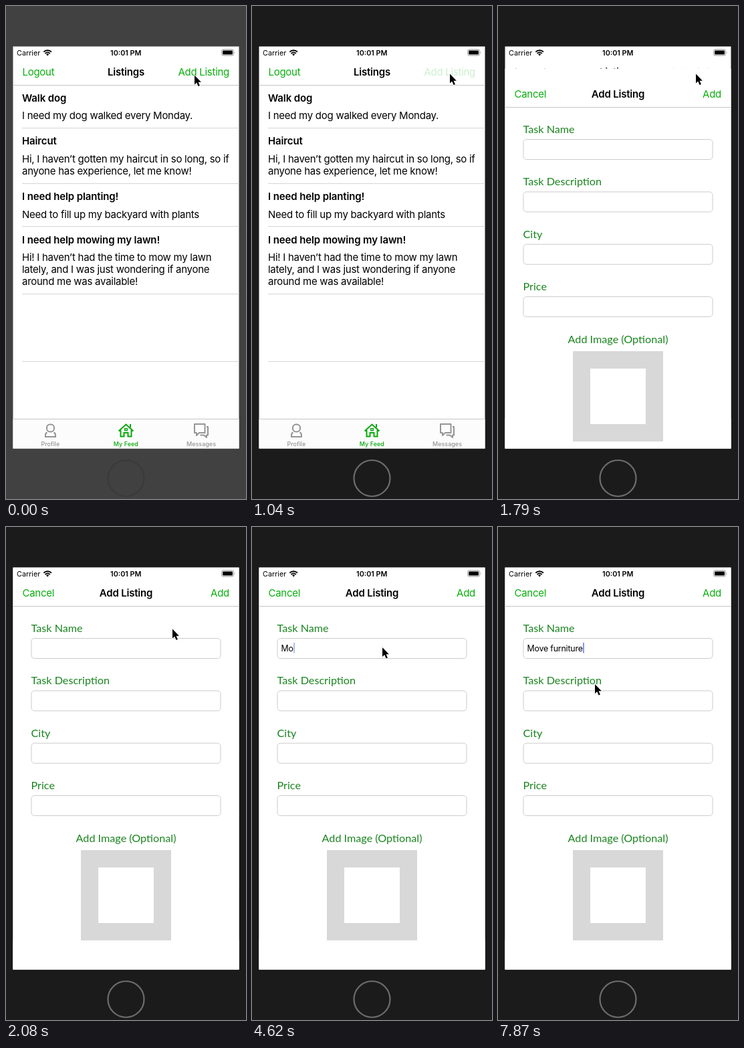
Recreate the animation shown at these times as an HTML page. Size 359 px wide and 737 px high, loop 8000 ms.

```html
<!DOCTYPE html>
<html lang="en">
<head>
<meta charset="utf-8">
<title>Add a listing</title>
<style>
  html, body { margin: 0; width: 100%; height: 100%; overflow: hidden; background: #1b1b1b; }
  svg { display: block; width: 100%; height: 100%; }
  text { font-family: Inter, Roboto, "Liberation Sans", sans-serif; white-space: pre; fill: #000; }
  .body { font-size: 15px; letter-spacing: -.27px; }
  .head { font-size: 15px; font-weight: 600; letter-spacing: -.12px; }
  .title { font-size: 15px; font-weight: 600; letter-spacing: -.2px; text-anchor: middle; }
  .link { font-size: 15px; letter-spacing: -.28px; fill: #08ae0c; }
  .status { font-size: 10.8px; }
  .tab { font-size: 9px; font-weight: 500; text-anchor: middle; fill: #959595; }
  .label { font-family: Lato, "Open Sans", sans-serif; font-size: 16.2px; fill: #1a851f; }
  .typed { font-size: 12.4px; letter-spacing: -.2px; }
  .end { text-anchor: end; }
  .mid { text-anchor: middle; }
  .rule { stroke: #d6d6d6; stroke-width: 1; }
  .bar { stroke: #c6c6c6; stroke-width: 1; }
  .field { fill: #fff; stroke: #cbcbcb; stroke-width: 1; }
  .icon { fill: none; stroke: #959595; stroke-width: 2; }
  .icon.on { stroke: #08a80c; }
  .tab.on { fill: #08a80c; }
</style>
</head>
<body>
<svg viewBox="0 0 359 737" preserveAspectRatio="none">
  <defs>
    <clipPath id="screen"><rect x="10.5" y="60.5" width="338" height="601"/></clipPath>
  </defs>
  <rect id="bezel" width="359" height="737"/>
  <circle id="home" cx="179.5" cy="706" r="27" fill="none" stroke-width="2.2"/>

  <g clip-path="url(#screen)">
    <rect x="10" y="60" width="340" height="603" fill="#fff"/>

    <g id="feed">
      <text class="link" x="24.5" y="104">Logout</text>
      <text class="title" x="179.5" y="104">Listings</text>
      <text class="link end" id="open" x="334" y="104">Add Listing</text>
      <path class="bar" d="M10 118.5H349"/>
      <g id="rows"></g>

      <rect x="10" y="617" width="340" height="45" fill="#fcfcfc"/>
      <path class="bar" d="M10 617.5H349"/>
      <g class="icon">
        <rect x="61" y="625.5" width="11" height="11" rx="4.8"/>
        <path d="M61.5 637.5Q59 638.5 59 641.5V644H74V641.5Q74 638.5 71.500 637.5"/>
      </g>
      <g class="icon on">
        <path d="M168.500 635.5L179.500 625.500L190.500 635.5M171.500 634V643.5H176.500V638H182.500V643.500H187.500V634M186 625V630"/>
        <rect x="177.700" y="631.700" width="3.600" height="3" stroke-width="1.500"/>
      </g>
      <g class="icon" stroke-linejoin="round">
        <path d="M282 625H297.500V638H289L285 642V638H282Z"/>
        <path d="M300 629H302V641.500H300V645L296 641.500H290.500"/>
      </g>
      <text class="tab" x="66.300" y="658">Profile</text>
      <text class="tab on" x="179.300" y="658">My Feed</text>
      <text class="tab" x="292" y="658">Messages</text>
    </g>

    <g id="sheet">
      <rect x="10" y="60.500" width="340" height="603" fill="#fff"/>
      <text class="link" x="24.500" y="104">Cancel</text>
      <text class="title" x="179.500" y="104">Add Listing</text>
      <text class="link end" x="334" y="104">Add</text>
      <path class="bar" d="M10 118.500H349"/>
      <g id="form"></g>
      <text class="label mid" x="179.500" y="470.500">Add Image (Optional)</text>
      <rect x="112" y="483" width="135" height="135" fill="#d8d8d8"/>
      <rect x="138" y="509" width="83" height="83" fill="#fff"/>
      <text class="typed" id="typed" x="43.500" y="185.600" xml:space="preserve"></text>
      <rect id="caret" y="173" width="1.600" height="15.500" fill="#3c62e2"/>
    </g>

    <text class="status" x="16" y="74">Carrier</text>
    <text class="status mid" x="179.300" y="74" font-weight="600">10:01 PM</text>
    <g fill="none" stroke="#000" stroke-width="1.800">
      <path d="M56.300 68.600A8.400 8.400 0 0 1 68 68.600M58.500 71A5.200 5.200 0 0 1 65.800 71"/>
      <path d="M60.100 72.300A3 3 0 0 1 64.200 72.300L62.150 74.500Z" fill="#000" stroke="none"/>
    </g>
    <rect x="322.500" y="65" width="18" height="9" rx="2.500" fill="none" stroke="#8a8a8a" stroke-width=".9"/>
    <rect x="324" y="66.500" width="15" height="6" rx="1.300"/>
    <path d="M341.800 68Q343.300 69.500 341.800 71Z" fill="#8a8a8a"/>
  </g>

  <path id="pointer" d="M0 0V14L3.200 11.100L5.600 16.400L7.900 15.400L5.600 10.300H9.900Z"
        fill="#000" stroke="#fff" stroke-width="1.500" paint-order="stroke" stroke-linejoin="round"/>
</svg>

<script>
const LOOP = 8000;
const $ = id => document.getElementById(id);
const PHRASE = 'Move furniture';

const text = (cls, x, y, s) => `<text class="${cls}" x="${x}" y="${y}">${s}</text>`;

// heading baseline, divider, heading, lines of text
const rows = [
  [142.5, 182.5, 'Walk dog', 'I need my dog walked every Monday.'],
  [207, 265.5, 'Haircut', 'Hi, I haven’t gotten my haircut in so long, so if', 'anyone has experience, let me know!'],
  [290, 329.5, 'I need help planting!', 'Need to fill up my backyard with plants'],
  [354.5, 430.5, 'I need help mowing my lawn!', 'Hi! I haven’t had the time to mow my lawn',
    'lately, and I was just wondering if anyone', 'around me was available!'],
  [0, 531.5, '']
];
$('rows').innerHTML = rows.map(([y, rule, head, ...lines]) =>
  text('head', 24, y, head) +
  lines.map((s, i) => text('body', 24, y + 26.5 + i * 18.1, s)).join('') +
  `<path class="rule" d="M24 ${rule}H349"/>`).join('');

$('form').innerHTML = ['Task Name', 'Task Description', 'City', 'Price'].map((s, i) => {
  const y = 157 + i * 78.35;
  return text('label', 37.5, y, s) +
    `<rect class="field" x="38" y="${y + 9.5}" width="283" height="30" rx="4.5"/>`;
}).join('');

// time, x, y of the pointer tip
const moves = [
  [0, 282, 103.5], [150, 284, 102], [450, 291, 101.5], [600, 296, 101.5],
  [1930, 283, 119], [2080, 249, 152.5], [2230, 222, 170], [2380, 204, 178],
  [2520, 197, 180], [2670, 195, 180], [7730, 188, 190], [7870, 145, 235]
];
// time, letters typed, caret strength
const keys = [
  [0, 0, 0], [3270, 0, .5], [3420, 0, 1], [3720, 1, 1], [3870, 2, .7], [4020, 2, 1],
  [4620, 2, .5], [4770, 3, .7], [4920, 3, 1], [5210, 4, 1], [5360, 5, 1],
  [5950, 6, 1], [6100, 7, 1], [6250, 8, 1], [6540, 9, 1], [6690, 10, 1],
  [6990, 11, 1], [7130, 13, 1], [7280, 14, 1], [7730, 14, .8]
];
// moments at which the rising sheet is redrawn
const rises = [[0], [1640], [1790], [1930], [2080]];

const at = (table, t) => table.findLast(step => step[0] <= t);

// critically damped rise, in px below the resting place
function sheetDrop(t) {
  const [shown] = at(rises, t);
  if (shown < 1640) return 610;
  if (shown >= 2080) return 0;
  const p = 18.26 * (shown - 1532) / 1000;
  return 643 * (1 + p) * Math.exp(-p);
}

function draw(t) {
  const lit = t < 1040;
  $('bezel').setAttribute('fill', lit ? '#414141' : '#1b1b1b');
  $('home').setAttribute('stroke', lit ? '#3a3a3a' : '#6c6c6c');
  $('open').setAttribute('opacity', lit ? 1 : .2);
  $('sheet').setAttribute('transform', `translate(0 ${sheetDrop(t).toFixed(2)})`);

  const [, count, glow] = at(keys, t);
  const typed = $('typed');
  typed.textContent = PHRASE.slice(0, count);
  const width = count ? typed.getComputedTextLength() : 0;
  $('caret').setAttribute('x', 44 + width);
  $('caret').setAttribute('opacity', glow);

  const [, x, y] = at(moves, t);
  $('pointer').setAttribute('transform', `translate(${x} ${y})`);
}

const start = performance.now();
function tick() {
  draw((performance.now() - start) % LOOP);
  requestAnimationFrame(tick);
}
draw(0);
requestAnimationFrame(tick);
</script>
</body>
</html>
```
